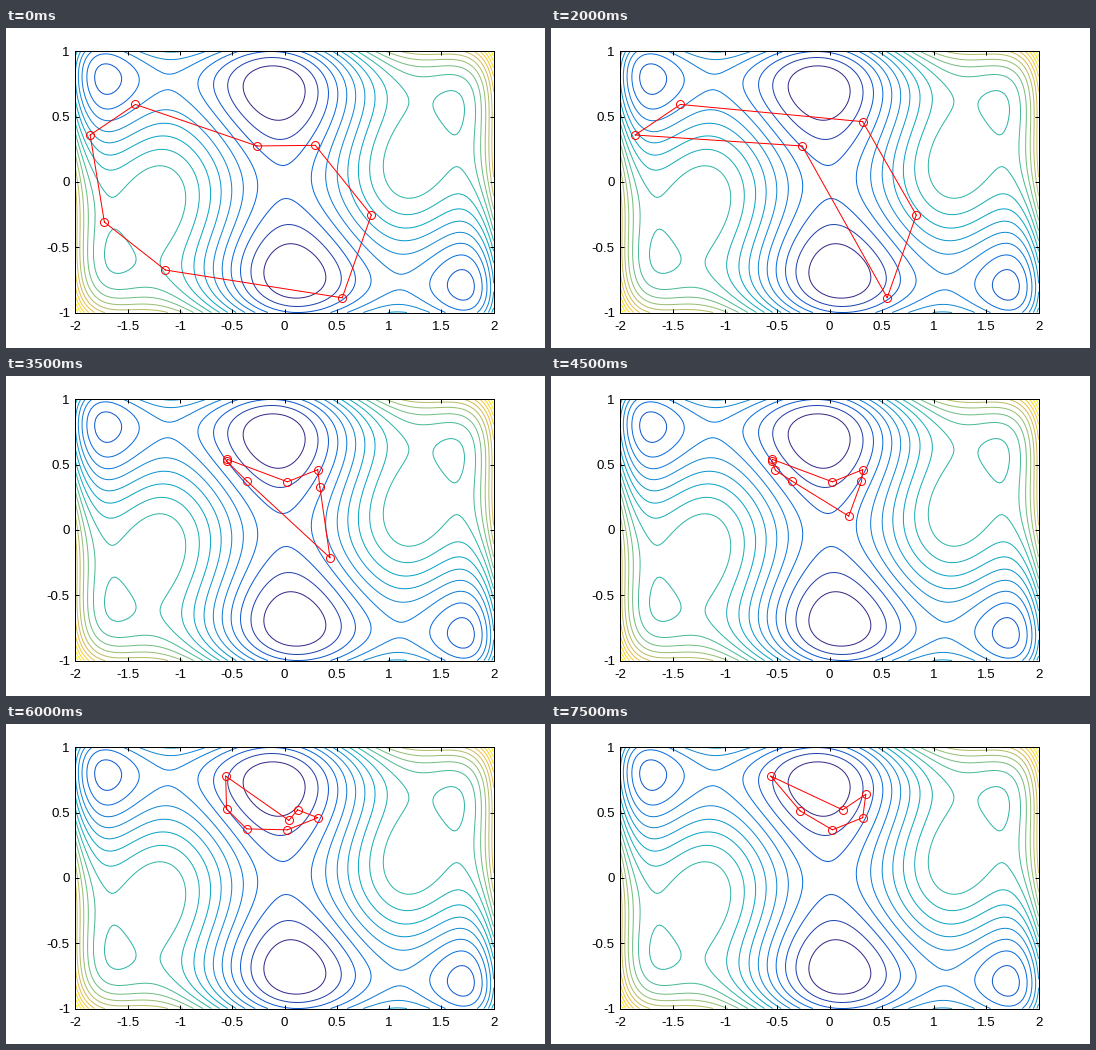
These frames come from a looping animation (539x320 px, 8 s). A matplotlib script:

```python
import numpy as np
import matplotlib.pyplot as plt
from matplotlib.animation import FuncAnimation
from matplotlib.colors import LinearSegmentedColormap
from matplotlib.tri import Triangulation

W, H, DPI = 539, 320, 72          # at 72 dpi one point is one pixel
LEFT, RIGHT, TOP, BOTTOM = 69.4, 487.6, 23.45, 284.55
FRAMES, INTERVAL = 16, 500

plt.rcParams["font.family"] = "Liberation Sans"
plt.rcParams["font.size"] = 13.33

START = np.array([
    (-1.859, 0.360), (-1.426, 0.594), (-0.262, 0.276), (0.294, 0.281),
    (0.830, -0.253), (0.552, -0.887), (-1.140, -0.674), (-1.723, -0.307),
])


def camelback(x, y):
    return (4 - 2.1 * x**2 + x**4 / 3) * x**2 + x * y + (4 * y**2 - 4) * y**2


def descend(points):
    """One simplex move: reflect the worst point, else contract, else shrink."""
    f = camelback(*points.T)
    worst = f.argmax()
    center = np.delete(points, worst, axis=0).mean(axis=0)
    out = points.copy()
    for factor, limit in ((1, np.sort(f)[-2]), (-0.5, f[worst])):
        out[worst] = center + factor * (center - points[worst])
        if camelback(*out[worst]) < limit:
            return out
    return (points + points[f.argmin()]) / 2


def circumradii(corners):
    a, b, c = corners.transpose(1, 0, 2)
    u, v = b - a, c - a
    cross = np.abs(u[:, 0] * v[:, 1] - u[:, 1] * v[:, 0])
    sides = [np.hypot(*d.T) for d in (u, v, c - b)]
    return np.prod(sides, axis=0) / (2 * cross)


def carve(neighbors, radii, alpha):
    """Peel large triangles from the outside; return the rest and its open sides."""
    keep = np.ones(len(radii), bool)
    while True:
        is_open = (neighbors < 0) | ~keep[neighbors]
        peel = keep & (radii > alpha) & is_open.any(axis=1)
        if not peel.any():
            return keep, is_open & keep[:, None]
        keep &= ~peel


def in_one_piece(triangles, count):
    if len(triangles) == 0:
        return False
    reached = set(triangles[0])
    for _ in triangles:
        for t in triangles:
            if reached & set(t):
                reached |= set(t)
    return len(reached) == count


def boundary(points):
    """Edges of a hull shrunk halfway towards the tightest connected shape."""
    tri = Triangulation(*points.T)
    triangles, neighbors = tri.triangles, tri.neighbors
    radii = circumradii(points[triangles])
    alphas = [a for a in np.unique(radii)
              if in_one_piece(triangles[carve(neighbors, radii, a)[0]], len(points))]
    sides = carve(neighbors, radii, alphas[(len(alphas) - 1) // 2])[1]
    return [(triangles[t, k], triangles[t, (k + 1) % 3])
            for t, k in np.argwhere(sides)]


def build_shapes():
    points, shapes = START, []
    for _ in range(FRAMES):
        edges = boundary(points)
        gap = np.full((1, 2), np.nan)
        path = np.vstack([np.vstack([points[list(e)], gap]) for e in edges])
        shapes.append((path, points[np.unique(edges)]))
        points = descend(points)
    return shapes


parula = LinearSegmentedColormap.from_list("blue_yellow", [
    "#352a87", "#0363e1", "#1485d4", "#06a7c6", "#38b99e",
    "#92bf73", "#d9ba56", "#fcce2e", "#f9fb0e",
])

fig = plt.figure(figsize=(W / DPI, H / DPI), dpi=DPI, facecolor="white")
ax = fig.add_axes([LEFT / W, 1 - BOTTOM / H, (RIGHT - LEFT) / W, (BOTTOM - TOP) / H])

x, y = np.meshgrid(np.linspace(-2, 2, 161), np.linspace(-1, 1, 81))
z = camelback(x, y)
levels = np.linspace(z.min(), z.max(), 22)[1:-1]
ax.contour(x, y, z, levels=levels, cmap=parula, linewidths=1,
           linestyles="solid", vmin=levels[0], vmax=levels[-1], zorder=1)

ax.set_xlim(-2, 2)
ax.set_ylim(-1, 1)
xticks, yticks = np.arange(-2, 2.1, 0.5), np.arange(-1, 1.1, 0.5)
ax.set_xticks(xticks, [f"{v:g}" for v in xticks])
ax.set_yticks(yticks, [f"{v:g}" for v in yticks])
ax.tick_params(direction="in", length=4, width=1, top=True, right=True)
ax.tick_params(axis="x", pad=8)
ax.tick_params(axis="y", pad=5.5)
for spine in ax.spines.values():
    spine.set_linewidth(1)

line, = ax.plot([], [], "-", color="red", lw=1, solid_capstyle="round", zorder=4)
rings, = ax.plot([], [], "o", ms=8, mfc="none", mec="red", mew=1, zorder=4)

shapes = build_shapes()


def update(i):
    path, corners = shapes[i]
    line.set_data(*path.T)
    rings.set_data(*corners.T)
    return line, rings


anim = FuncAnimation(fig, update, frames=FRAMES, interval=INTERVAL,
                     repeat=True, repeat_delay=0, blit=False)
plt.show()
```
